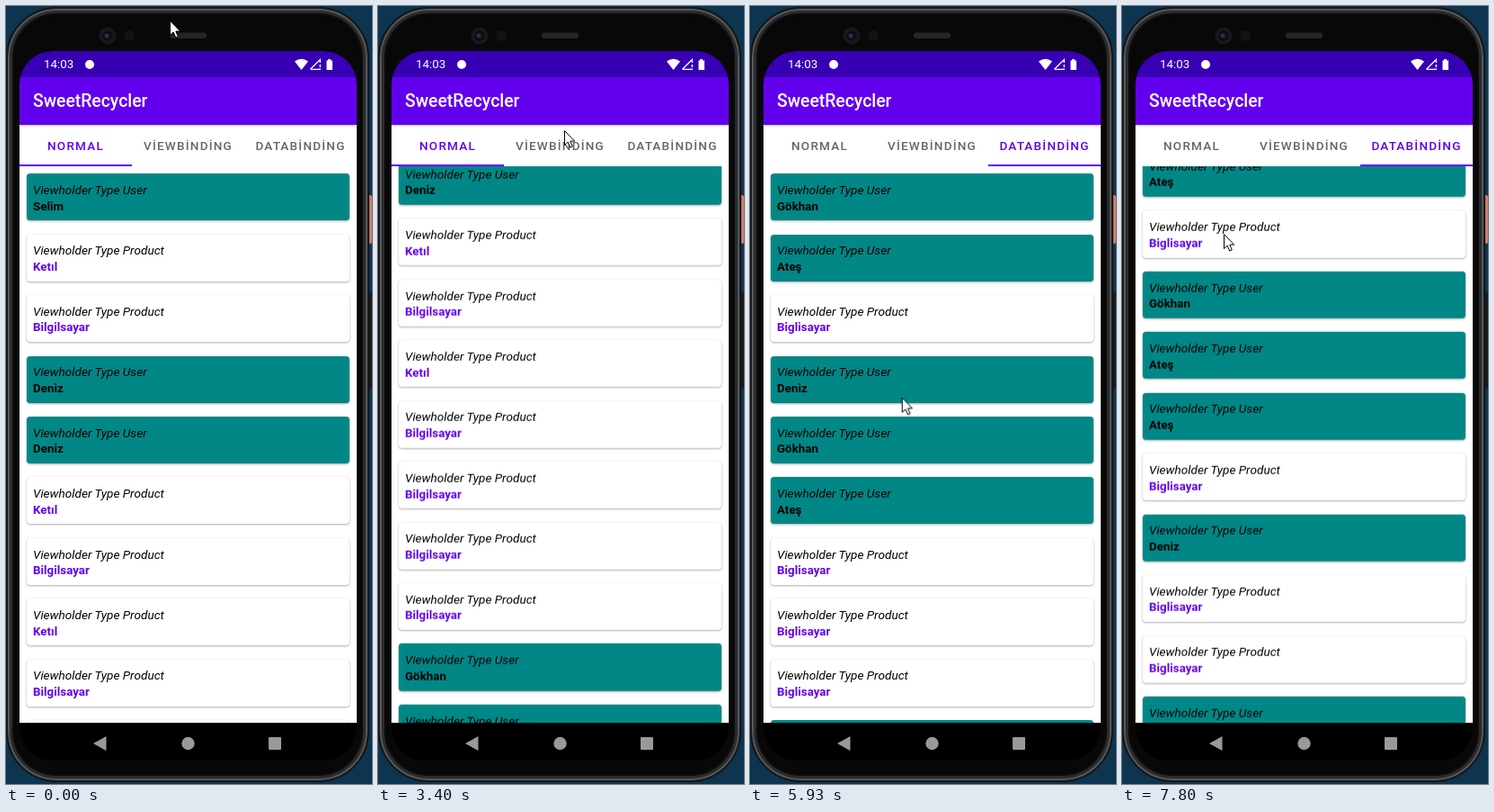
Animation of 407 by 864 pixels, one loop 8000 ms. Source, as an HTML page:

```html
<!DOCTYPE html>
<html lang="tr">
<head>
<meta charset="utf-8">
<title>Recycler demo</title>
<style>
  html, body { margin: 0; width: 100%; height: 100%; overflow: hidden; background: #0d3550; }
  * { box-sizing: border-box; }
  #stage { position: relative; width: 407px; height: 864px; overflow: hidden; font: 13.37px Roboto, sans-serif; }
  #stage div, #stage svg { position: absolute; }

  .key { left: 402px; width: 4.5px; border-radius: 0 2px 2px 0; }
  .power { top: 210px; height: 54px; background: #cf7a6c; }
  .volume { top: 318px; height: 107px; background: #17191b; }
  .body { left: 0; top: 1px; width: 403.5px; height: 861px; border-radius: 56px; background: #080809;
    border: 2px solid #161718; box-shadow: inset 0 0 0 2px #55585a, inset 0 0 0 5px #2a2b2c, inset 0 0 3px 6px #131314; }
  .screen { left: 15px; top: 50px; width: 375px; height: 788px; border-radius: 37px; overflow: hidden; background: #000; }

  .status { width: 375px; height: 29px; background: #3700b3; color: #fff; }
  .clock { left: 27px; top: 7px; line-height: 16px; }
  .badge { left: 73px; top: 10px; width: 10px; height: 10px; border-radius: 50%; background: #fff; }
  .bar { top: 29px; z-index: 1; width: 375px; height: 53px; background: #6200ee; color: #fff;
    font-size: 19.35px; font-weight: 500; line-height: 54px; padding-left: 15px; box-shadow: 0 1px 2px rgba(0,0,0,.25); }
  .tabs { top: 82px; width: 375px; height: 46px; background: #fff; }
  .tab { top: 0; width: 125px; line-height: 47px; text-align: center; white-space: nowrap;
    font-size: 13.55px; font-weight: 500; letter-spacing: .0893em; color: #666; }
  .tab:nth-child(2) { left: 125px; }
  .tab:nth-child(3) { left: 250px; }
  .line { top: 44px; width: 125px; height: 2px; background: #6200ee; }

  .pager { top: 128px; width: 375px; height: 618px; background: #fff; overflow: hidden; }
  .page { top: 0; width: 375px; height: 618px; }
  .card { left: 7.6px; width: 359.8px; height: 52.1px; padding: 8.7px 7.4px 0; border-radius: 3.8px;
    line-height: 18.7px; white-space: nowrap; background: #fff; color: #6200ee;
    box-shadow: 0 1px 2.5px rgba(0,0,0,.32), 0 0 1px rgba(0,0,0,.14); }
  .card.user { background: #018786; color: #000; }
  .card i, .card b { display: block; }
  .card i { color: #000; font-size: 13.6px; }

  /* One 8 s loop: percent = ms / 80 */
  .tab, .line, .strip, .page, .cursor { animation: 8s linear infinite; }
  .tab:nth-child(1) { animation-name: first; }
  .tab:nth-child(2) { animation-name: second; }
  .tab:nth-child(3) { animation-name: third; }
  .line { animation-name: line; }
  .strip { animation-name: swipe; }
  .page:nth-child(1) { animation-name: scroll1; }
  .page:nth-child(2) { animation-name: scroll2; left: 375px; }
  .page:nth-child(3) { animation-name: scroll3; left: 750px; }
  .cursor { animation-name: cursor; left: 0; top: 0; overflow: visible; }

  @keyframes first { 0%, 43.37% { color: #6200ee } 43.38%, 100% { color: #666 } }
  @keyframes second { 0%, 43.37% { color: #666 } 43.38%, 65.87% { color: #6200ee } 65.88%, 100% { color: #666 } }
  @keyframes third { 0%, 65.87% { color: #666 } 65.88%, 100% { color: #6200ee } }
  @keyframes line {
    0%, 43.375%, 47.5%, 65.875% { animation-timing-function: cubic-bezier(.4,0,.2,1) }
    0%, 43.375% { transform: none }
    47.5%, 65.875% { transform: translateX(125px) }
    70%, 100% { transform: translateX(250px) }
  }
  @keyframes swipe {
    0%, 43.375%, 47.5%, 65.875% { animation-timing-function: cubic-bezier(.4,0,.2,1) }
    0%, 43.375% { transform: none }
    47.5%, 65.875% { transform: translateX(-375px) }
    70%, 100% { transform: translateX(-750px) }
  }
  @keyframes scroll1 {
    0%, 20.875% { transform: none }
    22.5%, 23.1% { transform: translateY(-75px) }
    24.375% { transform: translateY(-176px); animation-timing-function: cubic-bezier(.2,.5,.4,1) }
    30.875%, 100% { transform: translateY(-287.3px) }
  }
  @keyframes scroll2 {
    0%, 53.375% { transform: none }
    55.8%, 56.5% { transform: translateY(-308.3px); animation-timing-function: cubic-bezier(.3,.5,.5,1) }
    63.375%, 100% { transform: translateY(-979.7px) }
  }
  @keyframes scroll3 {
    0%, 78.75% { transform: none }
    81.6%, 82.2% { transform: translateY(-335.7px); animation-timing-function: cubic-bezier(.25,.5,.5,1) }
    86.25%, 87% { transform: translateY(-760px) }
    90% { transform: translateY(-1070px); animation-timing-function: cubic-bezier(.25,.5,.5,1) }
    95%, 100% { transform: translateY(-1375.3px) }
  }
  @keyframes cursor {
    0%, 3.375% { transform: translate(182px,16px) }
    5.875%, 8.375% { transform: translate(223px,40px) }
    10.5% { transform: translate(192px,60px) }
    13% { transform: translate(177px,230px) }
    16.5% { transform: translate(205px,510px) }
    18.375% { transform: translate(216px,573px) }
    19.125%, 20.875% { transform: translate(213px,583px) }
    22.5%, 23.1% { transform: translate(227px,486px) }
    24.375% { transform: translate(236px,385px) }
    25.5%, 31% { transform: translate(240px,369px) }
    34% { transform: translate(264px,300px) }
    38.5% { transform: translate(200px,170px) }
    40.875%, 44.5% { transform: translate(207px,138px) }
    49% { transform: translate(238px,400px) }
    52.5%, 53.375% { transform: translate(252px,533px) }
    55.8%, 56.5% { transform: translate(247px,203px) }
    57.5% { transform: translate(258px,146px) }
    63.375%, 67.5% { transform: translate(323px,156px) }
    74% { transform: translate(170px,430px) }
    77%, 78.75% { transform: translate(142px,532px) }
    81.6%, 82.2% { transform: translate(124px,175px) }
    83% { transform: translate(122px,149px) }
    86.25%, 87% { transform: translate(134px,470px) }
    90% { transform: translate(120px,149px) }
    95%, 96.5% { transform: translate(116px,263px) }
    97.5%, 100% { transform: translate(113px,253px) }
  }
</style>
</head>
<body>
<div id="stage">
  <div class="key power"></div>
  <div class="key volume"></div>
  <div class="body"></div>
  <svg width="407" height="50">
    <circle cx="113" cy="33" r="9.5" fill="#17181a"/>
    <circle cx="113" cy="33" r="5.5" fill="#0b0d12"/>
    <circle cx="112" cy="33" r="2.5" fill="#26304a"/>
    <circle cx="137" cy="33" r="6" fill="#121213"/>
    <rect x="182" y="29.500" width="41" height="6.500" rx="3" fill="#252628"/>
  </svg>

  <div class="screen">
    <div class="status">
      <div class="clock">14:03</div>
      <div class="badge"></div>
      <svg width="375" height="29" fill="#fff">
        <path d="M306 11.500Q313.500 6 321 11.500L313.500 21Z"/>
        <path d="M323.500 20.300L334.300 9.500V13M334.300 20.300H323.500M334.300 15V18M334.300 19.200V20.800" fill="none" stroke="#fff" stroke-width="1.300"/>
        <path d="M341.500 10.500H343V9H346V10.500H348V21H341.500Z"/>
      </svg>
    </div>
    <div class="bar">SweetRecycler</div>
    <div class="tabs">
      <div class="tab">NORMAL</div>
      <div class="tab">VİEWBİNDİNG</div>
      <div class="tab">DATABİNDİNG</div>
      <div class="line"></div>
    </div>
    <div class="pager"><div class="strip"></div></div>
    <svg style="top:746px" width="375" height="42" fill="#999">
      <path d="M82 23L96.500 15V31Z"/>
      <circle cx="187.500" cy="23" r="7.200"/>
      <rect x="277" y="16" width="14" height="14" rx="1"/>
    </svg>
  </div>

  <svg class="cursor" width="14" height="22">
    <path d="M.5.5V16.500L4.200 13.100L6.700 19L9.300 17.900L6.800 12.100H11.700Z" fill="#fff" stroke="#000" stroke-width="1"/>
  </svg>
</div>

<script>
  const PITCH = 67.44, TOP = 8.2;
  const users = { S: 'Selim', D: 'Deniz', G: 'Gökhan', A: 'Ateş' };
  const products = { K: 'Ketıl', B: 'Bilgilsayar', C: 'Biglisayar' };

  // One letter per row, top to bottom
  const pages = [
    'SKBDDKBKBBBBGGKB',
    'KGBAGGGGAGBBBGBAGAGGKGAGBG',
    'GACDGACCCAAACACGACDGACGAACDCCAGC'
  ];

  function card(letter, row) {
    const user = letter in users;
    const name = user ? users[letter] : products[letter];
    return `<div class="card${user ? ' user' : ''}" style="top:${TOP + row * PITCH}px">` +
      `<i>Viewholder Type ${user ? 'User' : 'Product'}</i><b>${name}</b></div>`;
  }

  document.querySelector('.strip').innerHTML = pages
    .map(rows => `<div class="page">${[...rows].map(card).join('')}</div>`)
    .join('');
</script>
</body>
</html>
```
